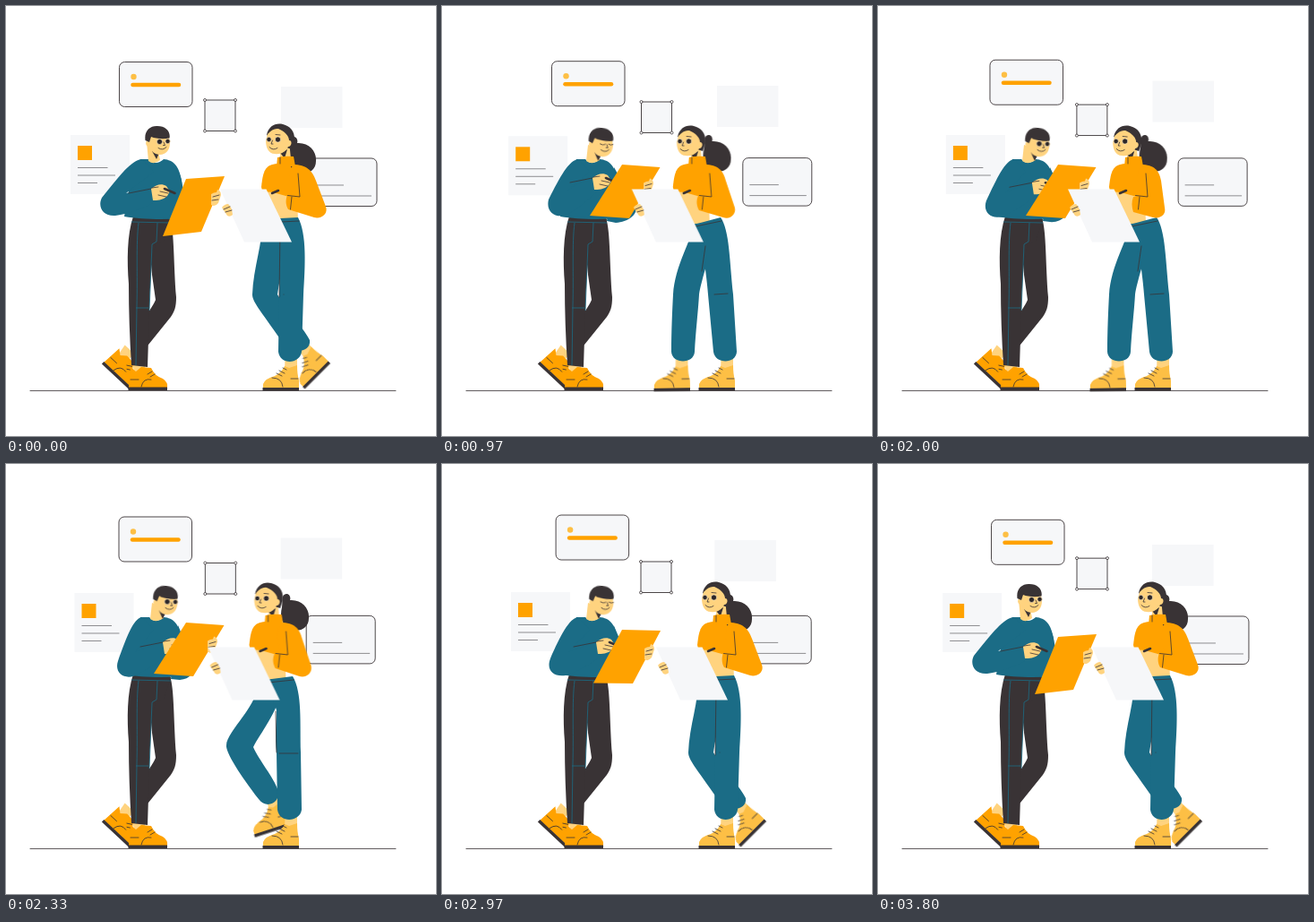
Write an HTML page that moves like this. It is 480 px wide and 480 px high and loops after 3830 ms.

```html
<!DOCTYPE html>
<html lang="en">
<head>
<meta charset="utf-8">
<title>Two people with clipboards</title>
<style>
html, body { margin: 0; width: 100%; height: 100%; overflow: hidden; background: #fff; }
svg { display: block; width: 480px; height: 480px; }
:root { --ink: #393335; --teal: #1b6c86; --orange: #ffa200; --amber: #fdbf45; --skin: #ffd37f; --pale: #f6f7f9; }
.ink { fill: var(--ink); } .teal { fill: var(--teal); } .orange { fill: var(--orange); }
.amber { fill: var(--amber); } .skin { fill: var(--skin); } .pale { fill: var(--pale); }
.line { fill: none; stroke: var(--ink); stroke-width: .8; stroke-linecap: round; }
.soft { fill: none; stroke: #8d8d90; stroke-width: 1; }
.seam { fill: none; stroke: var(--teal); stroke-width: .8; }
.frame { fill: var(--pale); stroke: var(--ink); stroke-width: .9; }
.eye { fill: #2c2729; stroke: #ffe9bd; stroke-width: .7; }
.pen { fill: none; stroke: var(--ink); stroke-width: 2.6; stroke-linecap: round; }
.move { animation: 3.83s linear infinite; }
.pose { animation: 3.83s ease-in-out infinite; }

/* floating cards */
#banner { animation-name: banner; }
@keyframes banner {
  0%, 100% { translate: 0 0; } 11.2% { translate: -2.3px .7px; } 25.3% { translate: -4px -.8px; }
  39.9% { translate: -3px -.5px; } 60.8% { translate: -.5px -3.5px; } 77.5% { translate: .6px -5.5px; }
}
#selection { animation-name: selection; }
@keyframes selection {
  0%, 100% { translate: 0 0; } 11.2% { translate: 1.3px .5px; } 25.3% { translate: .5px 2px; }
  39.9% { translate: -.7px 4.5px; } 60.8% { translate: .3px 5.5px; } 77.5% { translate: 0 4px; }
}
#blank { animation-name: blank; }
@keyframes blank {
  0%, 100% { translate: 0 0; } 11.2% { translate: .6px 0; } 25.3% { translate: 0 -1px; }
  39.9% { translate: -.8px -5px; } 60.8% { translate: -.3px -7.5px; } 77.5% { translate: -2.7px -5px; }
  99.2% { translate: -1px 0; }
}
#note { animation-name: note; }
@keyframes note {
  0%, 100% { translate: 0 0; } 11.2% { translate: 1px 1.7px; } 25.3% { translate: 2.2px 1.3px; }
  39.9% { translate: 3px 0; } 60.8% { translate: 4.5px 0; } 77.5% { translate: 5px -1px; }
}
#message { animation-name: message; }
@keyframes message {
  0%, 100% { translate: 0 0; } 11.2% { translate: -.7px -.5px; } 25.3% { translate: -1.2px -.4px; }
  39.9% { translate: -2px .5px; } 60.8%, 77.5% { translate: -1.8px -.6px; }
}

/* man */
#manHead { animation-name: manHead; transform-origin: 169px 152px; }
@keyframes manHead {
  0%, 87%, 100% { transform: none; } 11.2% { transform: translate(10.5px, 3px) rotate(8deg); }
  25.3% { transform: translate(8px, 2px) rotate(5deg); }
  39.9%, 60.8%, 78% { transform: translate(8.5px, 2px) rotate(5deg); }
}
#neck { animation-name: neck; }
@keyframes neck {
  0%, 87%, 100% { d: path("M157 152L169 157L172 172Q165 178 159 173Z"); }
  11.2%, 78% { d: path("M163 155L176 160L176 172Q168 178 161 173Z"); }
}
#open, #shut { animation-timing-function: step-end; }
#open { animation-name: open; }
#shut { animation-name: shut; }
@keyframes open { 0%, 27%, 79% { opacity: 1; } 23.6%, 75.6% { opacity: 0; } }
@keyframes shut { 0%, 27%, 79% { opacity: 0; } 23.6%, 75.6% { opacity: 1; } }
#clip { animation-name: clip; }
@keyframes clip {
  0%, 87%, 100% { d: path("M201 193L244 190L218 252L175 257Z"); }
  11.2% { d: path("M200 175L244 179L211 235L164 232Z"); }
  25.3%, 60.8%, 72% { d: path("M201 177L243.5 180L209 237L165 234Z"); }
  77.5% { d: path("M201 185L244 186L213 245L169 244.5Z"); }
}
#grip { animation-name: grip; }
@keyframes grip {
  0%, 87%, 100% { translate: 0 0; } 11.2% { translate: -5px -12.5px; }
  25.3%, 60.8%, 72% { translate: -4px -12.5px; } 77.5% { translate: -3px -4px; }
}
#farArm { animation-name: farArm; }
@keyframes farArm {
  0%, 87%, 100% { d: path("M190 180C197 190 198 205 198 215C199 225 199 237 190 238L182 238L186 200Z"); }
  11.2%, 39.9% { d: path("M192 180C200 195 213 215 217 224C218 233 208 241 194 242L184 240L190 200Z"); }
  60.8%, 74% { d: path("M192 180C198 195 207 215 209 224C210 233 206 240 194 241L184 240L190 200Z"); }
}
#sleeve { animation-name: sleeve; }
@keyframes sleeve {
  0%, 87%, 100% { d: path("M152 171C140 172 128 188 107 214C102 224 108 235 122 234C138 232 152 226 164 220L162 203C150 205 142 207 134 209L165 185Z"); }
  11.2% { d: path("M152 171C140 172 126 188 106 212C101 222 108 229 122 228C140 226 152 222 167 218L161 203C150 204 142 206 134 208L165 185Z"); }
  25.3% { d: path("M152 171C142 172 132 190 119 216C116 228 124 236 136 234C152 228 162 216 174 207L167 191C158 195 148 201 140 206L165 185Z"); }
  39.9% { d: path("M152 171C142 172 130 188 113 213C109 224 116 234 128 232C146 228 160 216 172 208L166 193C156 197 146 201 138 206L165 185Z"); }
  60.8% { d: path("M152 171C142 172 134 195 125 220C121 232 130 240 142 237C158 230 168 222 180 213L176 199C164 203 152 206 144 210L165 185Z"); }
  77.5% { d: path("M152 171C142 172 132 192 121 217C116 230 124 238 138 236C152 232 164 224 177 215L173 199C162 203 150 206 141 210L165 185Z"); }
}
#writer { animation-name: writer; }
@keyframes writer {
  0%, 11.2%, 87%, 100% { translate: 0 0; } 25.3% { translate: 6px -12px; } 39.9% { translate: 4px -10px; }
  60.8% { translate: 13px -5px; } 77.5% { translate: 10px -5px; }
}

/* woman */
.upper { animation-name: upper; }
@keyframes upper {
  0%, 66.3%, 100% { translate: 0 0; } 5.2%, 60.8% { translate: -13.5px 0; }
  11.2%, 55.6% { translate: -27px 0; } 39.9% { translate: -27.5px 0; }
}
#womanHead { animation-name: womanHead; }
@keyframes womanHead {
  0%, 66.3%, 100% { translate: 0 0; } 11.2% { translate: -.5px 2px; }
  25.3%, 55.6% { translate: -.8px 2px; } 60.8% { translate: .5px 1px; }
}
#tail { animation-name: tail; }
@keyframes tail {
  0%, 66.3%, 100% { transform: none; } 11.2%, 55.6% { transform: translate(4.5px, -4px); }
  60.8% { transform: translate(5px, -2px); }
}
#cuffArm { animation-name: cuffArm; }
@keyframes cuffArm {
  0%, 11.2%, 66.3%, 100% { d: path("M320 177C336 177 342 184 346 195L357 224C360 232 352 238 344 236L315 227C312 222 312 216 314 211L320 212L316 190Z"); }
  25.3% { d: path("M320 177C336 177 341 184 344 195L354 225C356 232 349 239 341 236L314 228C311 222 311 217 313 212L320 212L316 190Z"); }
  39.9%, 52% { d: path("M320 177C336 177 341 184 343 195L347 225C349 233 342 238 334 236L312 230C310 224 310 218 312 213L320 212L316 190Z"); }
  60.8% { d: path("M320 177C336 177 341 184 344 195L354 225C356 233 349 239 341 237L314 228C311 222 311 217 313 212L320 212L316 190Z"); }
}
#swing { animation-name: swing; }
@keyframes swing {
  0%, 66.3%, 100% { d: path("M286 238C287 265 276 292 275 322C275 330 282 337 309 376C318 390 341 387 339 373C334 362 316 343 303 322C306 300 314 270 322 242Z"); }
  5.2%, 60.8% { d: path("M281 242C284 268 246 298 246 314C245 322 262 348 282 374C291 386 306 378 304 365C299 350 282 330 276 316C284 300 302 280 312 242Z"); }
  11.2% { d: path("M281 243C280 262 250 290 249 322C249 340 252 365 254 385C256 399 280 399 281 385C279 365 277 340 277 322C283 308 300 285 308 242Z"); }
  25.3%, 55.6% { d: path("M282 243C278 262 260 290 258 322C257 340 256 365 256 386C257 400 281 400 282 386C283 365 286 340 287 322C289 308 297 285 308 242Z"); }
}
#stand { animation-name: stand; }
@keyframes stand {
  0%, 66.3%, 100% { d: path("M287 238L326 236C336 255 334 290 332 322L330 386C328 400 306 401 304 386L305 322C305 305 306 290 306 275C302 260 295 248 287 238Z"); }
  5.2%, 60.8% { d: path("M281 242L320 237C331 255 328 290 329 322L330 386C328 400 305 401 303 386L302 322C300 305 302 290 302 275C298 260 290 250 281 242Z"); }
  11.2%, 55.6% { d: path("M281 244L311 236C321 250 321 285 325 322L329 386C328 400 305 400 303 386L297 322C296 308 294 295 293 285C290 270 285 255 281 244Z"); }
}
#crease { animation-name: crease; }
@keyframes crease {
  0%, 66.3%, 100% { d: path("M306 250L305 325M288 242L327 240M310 322L310 322"); }
  5.2%, 60.8% { d: path("M301 276L302 322M283 245L321 241M305 323L326 323"); }
  11.2%, 55.6% { d: path("M294 268L290 296M283 246L312 240M304 322L319 321"); }
}
#step { animation-name: step; transform-origin: 307px 428px; }
@keyframes step {
  0%, 66.3%, 100% { transform: translate(40px, -16px) rotate(-45deg); }
  5.2%, 60.8% { transform: translate(-10px, -19px) rotate(-18deg); }
  11.2% { transform: translate(-45px, -.5px) rotate(-4deg); }
  25.3%, 55.6% { transform: translate(-50px, .5px) rotate(-1deg); }
}
</style>
</head>
<body>
<svg viewBox="0 0 480 480">
  <defs>
    <g id="manShoe">
      <path class="skin" d="M141 396H156L154 410H143Z"/>
      <path class="orange" d="M139 403L145 408L151 403L162 404Q166 413 175 416Q181 420 180 426H137Z"/>
      <path class="ink" d="M136.5 425.5H180V429H136.500Z"/>
      <path class="line" d="M158 411L163 408M161 414L166 411M151 425Q153 415 162 417M139 417H148"/>
    </g>
    <g id="womanShoe">
      <path class="skin" d="M312 384H325V405H311Z"/>
      <path class="amber" d="M287 427V422Q289 416 300 413Q308 409 311 402L316 404L325 401Q325 411 327 418V427Z"/>
      <path class="ink" d="M286.5 426H327V429.500H286.500Z"/>
      <path class="line" d="M302 410L308 413M305 407L311 410M309 404L313 406M297 415Q308 415 309 425M318 416H326"/>
    </g>
  </defs>

  <path class="line" d="M27 429.500H435"/>

  <g id="banner" class="move">
    <rect class="frame" x="126.500" y="62.500" width="81.500" height="50" rx="6"/>
    <circle class="amber" cx="142.500" cy="79" r="3.200"/>
    <path d="M141.500 88H193" fill="none" stroke="#ffa200" stroke-width="4.500" stroke-linecap="round"/>
  </g>
  <g id="selection" class="move">
    <rect class="frame" x="222" y="105" width="34" height="34.500"/>
    <g fill="#fff" stroke="#393335" stroke-width=".8">
      <circle cx="222" cy="105" r="1.500"/><circle cx="256" cy="105" r="1.500"/>
      <circle cx="222" cy="139.500" r="1.500"/><circle cx="256" cy="139.500" r="1.500"/>
    </g>
  </g>
  <rect id="blank" class="move pale" x="307" y="90" width="68.500" height="46"/>
  <g id="note" class="move">
    <rect class="pale" x="72" y="144" width="66" height="66"/>
    <rect class="orange" x="80" y="156" width="16" height="16"/>
    <path class="soft" d="M80 180.500H113.500M80 189H122M80 197.500H102"/>
  </g>
  <g id="message" class="move">
    <rect class="frame" x="337" y="170" width="77" height="53.500" rx="6"/>
    <path class="soft" d="M344.500 200H377M344.500 212H408"/>
  </g>

  <g id="man">
    <use href="#manShoe" transform="translate(-34.500 -14) rotate(43 158.500 427.500)"/>
    <use href="#manShoe"/>
    <path class="ink" d="M161 237H183C188 250 187 290 190 325C190 336 188 341 184 347L159 378L150 385L152 352C158 343 164 335 167 328L163 300Z"/>
    <path class="ink" d="M142 235L184 238L176 262L167 266C162 285 161 310 160 340L158 403L140 401C138 370 137 340 137 310C135 285 135 255 142 235Z"/>
    <path class="seam" d="M140 241L184 242M148 242C145 265 147 300 146 335L145 401M169 242L168 263L163 266L160 340M145 337H159"/>
    <path id="farArm" class="pose teal"/>
    <path class="teal" d="M150 171H160Q167 179 176 171C187 172 193 178 196 195L197 237C175 239 150 238 132 235L138 200Z"/>
    <path id="neck" class="pose skin"/>
    <g id="manHead" class="pose">
      <path class="ink" d="M163 162L171 164L168 171Z"/>
      <path class="skin" d="M159 142H181L183 153C183 161 178 166 172 166C166 166 162 162 160 157C155 157 155 150 159 150Z"/>
      <path class="ink" d="M155.5 150C154 139 161 133.500 169 134C178 134 184 140 182.500 147.500C175 149 167 148 162 146L160 152Z"/>
      <g id="open" class="move">
        <circle class="eye" cx="171.500" cy="151.500" r="3.100"/><circle class="eye" cx="180.500" cy="151" r="2.700"/>
      </g>
      <path id="shut" class="move line" d="M168.500 152Q171.500 154 174.500 152M178 151.500Q180.500 153 183 151.500"/>
      <path class="line" d="M170 158.500Q175 162 179 157.500M176 152L177.500 155.500H175.500"/>
    </g>
    <path id="sleeve" class="pose teal"/>
    <g id="writer" class="pose">
      <path class="line" d="M137 209L162 204"/>
      <path class="skin" d="M162 204C168 199 174 198 179 201L183 207L180 212C175 217 168 217 164 217Z"/>
      <path class="line" d="M163 203L170 202M172 207L181 209M170 211L179 213"/>
      <path class="pen" d="M177 204L188.500 209"/>
    </g>
    <path id="clip" class="pose orange"/>
    <g id="grip" class="pose">
      <path class="skin" d="M229 210Q232 208 235 208L236 205Q240 206 240 211L237 220Q233 225 229 222Z"/>
      <path class="line" d="M231 213L238 211M230 217L237 216"/>
    </g>
  </g>

  <g id="woman">
    <g id="step" class="pose"><use href="#womanShoe"/></g>
    <use href="#womanShoe"/>
    <path class="pose upper skin" d="M290 205H325L326 243H293Z"/>
    <path id="swing" class="pose teal"/>
    <path id="stand" class="pose teal"/>
    <path id="crease" class="pose line"/>
    <g class="pose upper">
      <path class="orange" d="M303 176C289 177 287 184 285 202L288 214L322 222L334 190L322 177Z"/>
      <g id="womanHead" class="pose">
        <path id="tail" class="pose ink" d="M317 149C320 143 327 147 325 153C338 152 347 162 346 173C346 184 336 189 327 186C317 183 313 173 316 161Z"/>
        <path class="skin" d="M306 155L316 150L318 171H306Z"/>
        <path class="ink" d="M306 164L314 160L311 170Z"/>
        <path class="ink" d="M291 144C293 134 301 130 309 132C318 134 323 141 322 151L319 160L313 158Z"/>
        <path class="skin" d="M292 143Q298 136 304 137C311 140 316 145 316 150C320 150 319 157 315 157C312 163 307 166 300 165C293 165 290 158 290 150Z"/>
        <circle class="eye" cx="293.500" cy="149" r="2.700"/><circle class="eye" cx="303.500" cy="149" r="3.100"/>
        <path class="line" d="M294 157.500Q298 162 303 158.500M297.500 150L296 154H298M301 143.500L306 144"/>
      </g>
      <path class="orange" d="M303 169Q312 167 321 168L323 179H302Z"/>
      <path class="skin" d="M287 207L298 208L316 213L317 227L300 225L288 218Z"/>
      <path id="cuffArm" class="pose orange"/>
      <path class="line" d="M314.500 211.500L328 213L326 187M319 213L317.500 227M306 176V169"/>
      <path class="pale" d="M239 204.500H290.500L319 263.500H266Z"/>
      <path class="pen" d="M297 209L304 206"/>
      <path class="skin" d="M241 225Q244 221 248 221Q252 224 253 233Q250 236 247 234Z"/>
      <path class="line" d="M243 227L250 224M245 230L252 228"/>
    </g>
  </g>
</svg>
</body>
</html>
```
